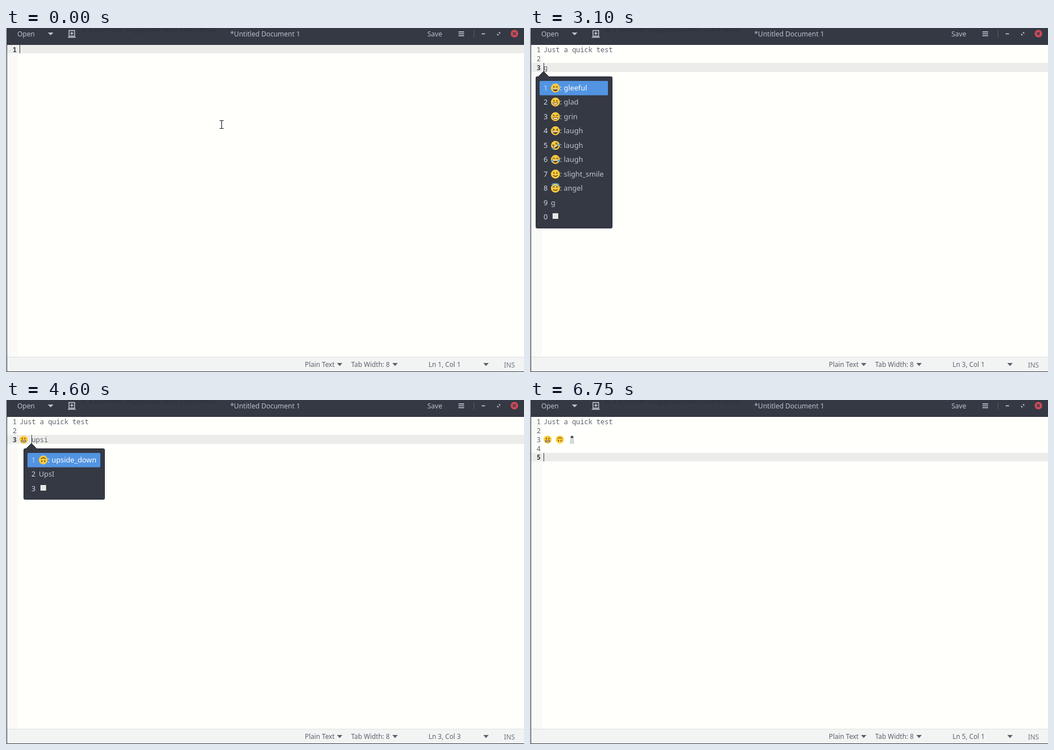
Recreate the animation shown at these times as an HTML page. Size 917 px wide and 611 px high, loop 8 s.

```html
<!DOCTYPE html>
<html lang="en">
<head>
<meta charset="utf-8">
<title>Emoji typing</title>
<style>
html, body { margin: 0; width: 100%; height: 100%; overflow: hidden; }
svg { display: block; width: 917px; height: 611px; }
text { white-space: pre; font: 12px "Noto Sans", "Open Sans", sans-serif; }
.bar text, .bar .ico { fill: #bac1cc; }
.status text, .status .ico { fill: #5c616c; }
.status text { font-size: 11.8px; }
.mono, .num { font-family: "Noto Sans Mono", "DejaVu Sans Mono", monospace; fill: #5c616c; }
.num { text-anchor: end; }
.now { font-weight: bold; fill: #3b3f4a; }
.menu text { font-size: 12.8px; fill: #bcc3cd; }
.menu .key { fill: #d3dae3; }
.menu .on { fill: #fff; }
.menu .key.on { fill: #bfd7f5; }
.panel { fill: #353944; stroke: #2b2e39; }
.face { fill: #5d4018; }
.ln { fill: none; stroke: #5d4018; stroke-width: 1.2; }
</style>
</head>
<body>
<svg viewBox="0 0 917 611">
  <rect width="917" height="611" fill="#fffffc"/>
  <rect x="2" y="30" width="20" height="555" fill="#fafbf8"/>
  <g id="doc"></g>
  <g class="bar">
    <rect width="917" height="30" fill="#343944"/>
    <rect y="29" width="917" height="1" fill="#2b2f3a"/>
    <text x="132" y="6" style="fill:#2c303b;font-size:13px">is a summer suggested with comments</text>
    <text x="20" y="14.5">Open</text>
    <text x="397" y="14.5">*Untitled Document 1</text>
    <text x="746" y="14.5">Save</text>
    <path class="ico" d="M74 8h10l-5 5z"/>
    <path d="M111.500 4.500h10v10h-10zM109.500 16.500h14M116.500 6.500v6M113.500 9.500h6" fill="none" stroke="#c9cfd8" stroke-width="1.400"/>
    <path class="ico" d="M801 6h10v1.700h-10zM801 9.400h10v1.700h-10zM801 12.800h10v1.700h-10zM842 9.500h6v1.700h-6z"/>
    <path d="M828.500 4v13" stroke="#535863"/>
    <path class="ico" d="M871.500 7.500h3.500v3.500zM869.500 9.500v3.500h3.500z"/>
    <circle cx="900" cy="10" r="6.700" fill="#cc4a58"/>
    <path d="M897.500 7.500l5 5m0-5l-5 5" stroke="#343944" stroke-width="1.500"/>
  </g>
  <g class="status">
    <rect y="584" width="917" height="27" fill="#f2f4f4"/>
    <rect y="584" width="917" height="1" fill="#dcdfe2"/>
    <text x="529" y="602">Plain Text</text>
    <text x="611" y="602">Tab Width: 8</text>
    <text x="748" y="602" id="pos"></text>
    <text x="881.5" y="603" style="fill:#6f747e">INS</text>
    <path class="ico" d="M586 595h9.500l-4.750 5.500zM684 595h9.500l-4.750 5.500zM845 595h9.500l-4.750 5.500z"/>
  </g>
  <path d="M1 30h1v580h915v1H1z" fill="#30343f"/>
  <rect width="1" height="611" fill="#d8dadc"/>
  <g id="beam" fill="none">
    <path d="M378 164.500h3l.7 1 .7-1h3M378 178.500h3l.7-1 .7 1h3M381.700 165v13" stroke="#fff" stroke-width="3"/>
    <path d="M378 164.500h3l.7 1 .7-1h3M378 178.500h3l.7-1 .7 1h3M381.700 165v13" stroke="#22252b" stroke-width="1.200"/>
  </g>
  <g id="menu" class="menu"></g>
</svg>
<script>
const $ = id => document.getElementById(id);
const pen = document.createElement('canvas').getContext('2d');
pen.font = '12.8px "Noto Sans", "Open Sans", sans-serif';

// Small faces, drawn in a circle of radius 8
const dots = '<ellipse cx="-2.600" cy="-2" rx="1" ry="1.600"/><ellipse cx="2.600" cy="-2" rx="1" ry="1.600"/>';
const arcs = '<path class="ln" d="M-4.800-1.200q1.900-3 3.600 0M1.200-1.200q1.900-3 3.600 0"/>';
const squints = '<path class="ln" d="M-4.800-3.800l3 2-3 1.600M4.800-3.800l-3 2 3 1.600"/>';
const laugh = '<path d="M-4.500 1h9a4.500 4.800 0 0 1-9 0z"/><path fill="#fff" d="M-4 1.200h8v1.300h-8z"/>';
const grin = '<path d="M-4.800 1h9.600a4.800 4.600 0 0 1-9.600 0z"/><path fill="#f4ead2" d="M-3.700 1.900h7.400a3.700 2.600 0 0 1-7.400 0z"/>';
const teeth = '<rect x="-4.800" y=".8" width="9.600" height="4.600" rx="2"/><path stroke="#f4ead2" stroke-width="1.200" d="M-3.700 2.200h7.400M-3.700 4.100h7.400"/>';
const smile = '<path class="ln" d="M-4 2q4 4 8 0"/>';
const tears = '<path fill="#4fa8e0" d="M-4-.5q-5 2-3.500 5 3 1 3.500-5zM4-.5q5 2 3.500 5-3 1-3.500-5z"/>';
const drop = '<path fill="#4fa8e0" d="M5.500-7q4 5 0 5.500-4-.5 0-5.500z"/>';
const halo = '<ellipse cy="-6.500" rx="6" ry="1.700" fill="none" stroke="#5fb4e8" stroke-width="1.300"/>';
const cheeks = '<circle cx="-5" cy="1.500" r="2.300" fill="#f0695e"/><circle cx="5" cy="1.500" r="2.300" fill="#f0695e"/>';
const face = (parts, turn = 0) =>
  `<g class="face" transform="rotate(${turn})"><circle r="7.900" fill="#fccb3d"/>${parts}</g>`;
const ball = color => `<circle r="6.500" fill="${color}"/>`;
const icons = {
  open: face(dots + laugh),
  glad: face(dots + grin),
  beam: face(arcs + grin),
  squint: face(squints + laugh),
  rofl: face(squints + laugh + tears, -35),
  joy: face(arcs + laugh + tears),
  smile: face(dots + smile),
  angel: face(arcs + smile + halo),
  sweat: face(arcs + laugh + drop),
  blush: face(cheeks + arcs + smile),
  teeth: face(dots + teeth),
  upside: face(dots + smile, 180),
  green: ball('#77b255'),
  gold: ball('#d9a441'),
  blue: ball('#6aa9dc'),
  salt: '<path fill="#d3dce5" stroke="#aab6c2" stroke-width=".6" d="M-2.300-3h4.600l1.700 10.500h-8z"/><path fill="#4d535e" d="M-2.800-3v-3q2.800-3 5.600 0v3z"/>'
};
const inline = { '😬': 'teeth', '🙃': 'upside', '🧂': 'salt' };
const icon = (name, x, y, scale) =>
  `<g transform="translate(${x} ${y}) scale(${scale})">${icons[name]}</g>`;

// Timeline
const states = [];
const add = (t, text, pre = '', rows) => states.push({ t, text, pre, rows });
const spread = (from, to, n, step) => {
  for (let k = 0; k < n; k++) step(Math.round((from + (to - from) * k / (n - 1 || 1)) / 50) * 50, k);
};
// One menu per typed letter, the last one for the whole word: "icon word,icon word|plain label"
const compose = (from, to, text, word, menus) => spread(from, to, menus.length, (t, k) => {
  const [items, label] = menus[k].split('|');
  const pre = word.slice(0, word.length - menus.length + k + 1);
  add(t, text, pre, [...items.split(',').map(s => s.split(' ')), ['', label], ['box', '']]);
});

const first = 'Just a quick test', head = first + '\n\n';
add(0, '');
add(250, 'J');
spread(400, 750, 6, (t, k) => add(t, first.slice(0, k + 2)));
spread(1000, 1600, 10, (t, k) => add(t, k < 9 ? first.slice(0, Math.round(7 + (k + 1) * 10 / 9)) : first + '\n'));
add(1750, head);
compose(3100, 3100, head, 'g', [
  'open gleeful,glad glad,beam grin,squint laugh,rofl laugh,joy laugh,smile slight_smile,angel angel|g'
]);
compose(3250, 3500, head, 'grima', [
  'beam grin,open grinning,teeth grimaced,green green_heart,green green_apple|gr',
  'beam grin,open grinning,teeth grimaced|grI',
  'teeth grimaced|grIm',
  'teeth grimaced|grIma'
]);
add(3800, head);
add(3850, head + '😬');
add(3950, head + '😬 ');
compose(4400, 4600, head + '😬 ', 'upsi', [
  'upside upside_down,smile unamused,blue umbrella,blue umbrella_with_rain,gold unlock,green up,gold urn,blue unicorn|u',
  'upside upside_down,green up|Up',
  'upside upside_down|Ups',
  'upside upside_down|UpsI'
]);
add(4950, head + '😬 🙃');
add(5250, head + '😬 🙃 ');
compose(5700, 6000, head + '😬 🙃 ', 'shaker', [
  'glad smile,beam smile,beam blissful,squint amused,sweat embarassed,smile pleased,upside ecstatic,blush blush|s',
  'salt shaker,green shamrock,blue shaved_ice,gold sheaf_of_rice|sh',
  'salt shaker,green shamrock,blue shaved_ice|sha',
  'salt shaker|shak',
  'salt shaker|shake',
  'salt shaker|shaker'
]);
const done = head + '😬 🙃 🧂';
add(6300, done);
add(6550, done + ' ');
add(6650, done + ' \n');
add(6750, done + ' \n\n');

const cell = 7.2, left = 24;
const width = s => [...s].reduce((w, c) => w + cell * (inline[c] ? 2 : 1), 0);

function drawLine(line, base) {
  let x = left, out = '';
  for (const run of line.split(/([😬🙃🧂])/u)) {
    out += inline[run]
      ? icon(inline[run], x + cell, base - 4.7, .9)
      : `<text class="mono" x="${x}" y="${base}">${run}</text>`;
    x += width(run);
  }
  return out;
}

function drawMenu(rows, caret) {
  const x = caret - 14;
  const w = Math.round(Math.max(...rows.map(([name, word]) =>
    icons[name] ? 57.3 + pen.measureText(': ' + word).width : 41 + pen.measureText(word).width)));
  let out = `<rect class="panel" x="${x + .5}" y="86.500" width="${w}" height="${Math.floor(rows.length * 25.5) + 14}" rx="2"/>
    <path class="panel" d="M${caret - 10} 87l10-10 10 10" stroke-linejoin="round"/>
    <rect x="${x + 7}" y="94" width="${w - 14}" height="25.500" rx="1.500" fill="#5294e2"/>`;
  rows.forEach(([name, word], i) => {
    const base = Math.floor(111 + i * 25.5), on = i ? '' : 'on';
    out += `<text class="key ${on}" x="${x + 14}" y="${base}">${(i + 1) % 10}</text>`;
    if (name === 'box') out += `<rect x="${x + 30}" y="${base - 11}" width="10" height="10" fill="#e6e7e4"/>`;
    else if (name) out += icon(name, x + 35, base - 4.5, 1) + `<text class="${on}" x="${x + 43}" y="${base}">: ${word}</text>`;
    else out += `<text x="${x + 27}" y="${base}">${word}</text>`;
  });
  return out;
}

function draw({ t, text, pre, rows }) {
  const lines = text.split('\n'), row = lines.length - 1;
  const caret = left + width(lines[row]);
  const tall = pre || (lines[2] || '') !== '';
  const top = 30 + 16 * row, high = row === 2 && tall ? 16 : 15;
  $('pos').textContent = `Ln ${row + 1}, Col ${[...lines[row]].length + 1}`;
  let out = `<rect x="2" y="${top}" width="915" height="${high}" fill="#ecedea"/>`;
  lines.forEach((line, i) => {
    const base = Math.round(43 + 15.6 * i) + (tall && i > 1 ? 1 : 0);
    out += `<text class="num ${i === row ? 'now' : ''}" x="19" y="${base}">${i + 1}</text>`;
    out += drawLine(i === row ? line + pre : line, base);
  });
  $('doc').innerHTML = out + `<rect x="${Math.floor(caret)}" y="${top}" width="1" height="${high}" fill="#33363e"/>`;
  $('menu').innerHTML = rows ? drawMenu(rows, Math.floor(caret)) : '';
  $('beam').style.display = t ? 'none' : '';
}

let shown;
function tick() {
  const t = performance.now() % 8000;
  const state = states.findLast(s => s.t <= t);
  if (state !== shown) draw(shown = state);
  requestAnimationFrame(tick);
}
tick();
</script>
</body>
</html>
```
